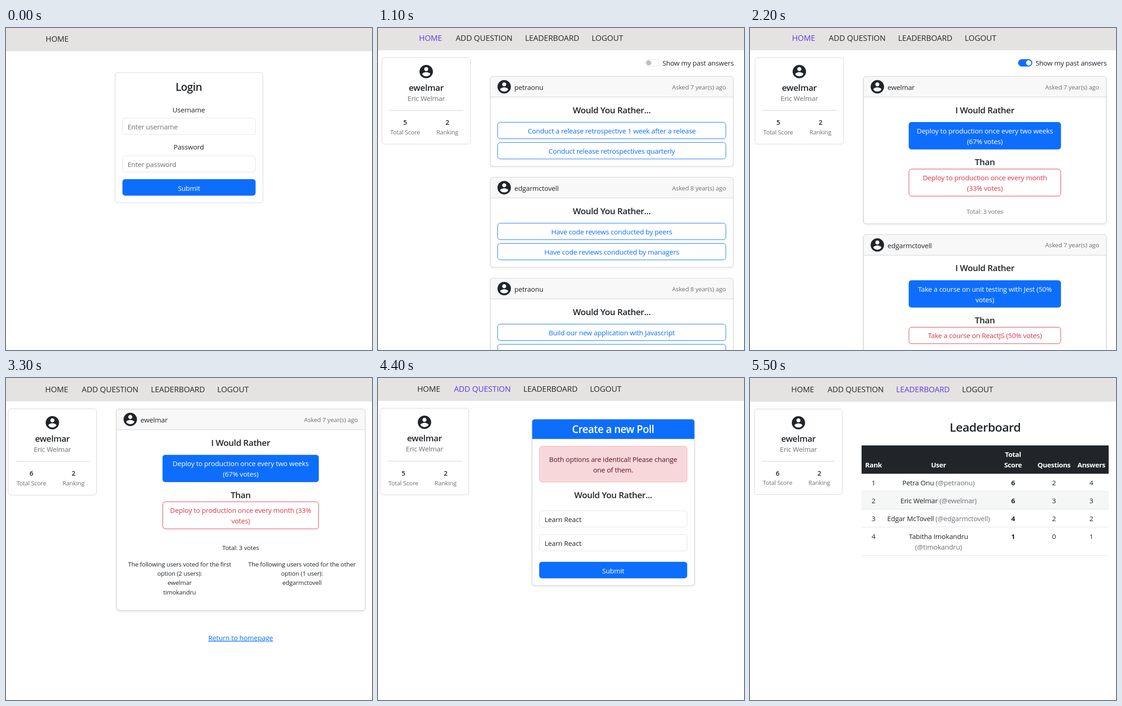
These frames come from a looping animation (797 by 702 pixels, 6.6 s). An HTML page:

```html
<!DOCTYPE html>
<html lang="en">
<head>
<meta charset="utf-8">
<title>Would You Rather</title>
<style>
  html, body { margin: 0; width: 100%; height: 100%; overflow: hidden; background: #fff; }
  svg { display: block; width: 797px; height: 702px; }
  text { font-family: "Open Sans", "Noto Sans", sans-serif; fill: #212529; text-anchor: middle; letter-spacing: -.013em; }
  .left { text-anchor: start; }
  .right { text-anchor: end; }
  .semi { font-weight: 600; letter-spacing: -.022em; }
  .bold { font-weight: 700; letter-spacing: -.03em; }
  .nav { letter-spacing: -.003em; }
  .gray { fill: #6c7075; }
  .white { fill: #fff; }
  .blue { fill: #0d6efd; }
  .red { fill: #dc3545; }
  .wine { fill: #58151c; }
  .active { fill: #6434e4; }
  .link { text-decoration: underline; }
  .shadow { filter: drop-shadow(0 2px 2px rgba(0, 0, 0, .075)); }
</style>
</head>
<body>
<svg id="stage" viewBox="0 0 797 702"></svg>
<script>
const STEP = 1100;
const BLUE = '#0d6efd', RED = '#dc3545', INK = '#212529', EDGE = '#d3d3d3', FIELD = '#dee2e6';

const me = { id: 'ewelmar', name: 'Eric Welmar' };
const petra = { id: 'petraonu', name: 'Petra Onu' };
const edgar = { id: 'edgarmctovell', name: 'Edgar McTovell' };
const tabitha = { id: 'timokandru', name: 'Tabitha Imokandru' };

// Open Sans looks larger than the UI font at the same nominal size.
const text = (str, x, y, cls = '', size = 16) =>
  `<text x="${x}" y="${y}" class="${cls}" font-size="${size * .9375}">${str}</text>`;

const lines = (list, x, y, cls, size, gap = 23.2) =>
  list.map((str, i) => text(str, x, y + i * gap, cls, size)).join('');

const box = (x, y, w, h, fill, stroke = 'none', cls = '', r = 6) =>
  `<rect x="${x}" y="${y}" width="${w}" height="${h}" rx="${r}" fill="${fill}" stroke="${stroke}" class="${cls}"/>`;

const rule = (x, y, w, color) => `<path d="M${x} ${y}h${w}" stroke="${color}"/>`;

const avatar = (x, y) => `<g transform="translate(${x} ${y})" fill="#fff">
  <circle r="14.6" fill="${INK}"/><circle cy="-5.3" r="4.4"/>
  <path d="M-8.8 5.8C-8.7 2.9-2.9 1.3 0 1.3S8.7 2.9 8.8 5.8C6.9 8.6 3.7 10.5 0 10.5S-6.9 8.6-8.8 5.8Z"/></g>`;

function headedCard(x, y, w, h, headH, headFill) {
  const r = 6;
  return box(x, y, w, h, '#fff', EDGE, 'shadow') +
    `<path d="M${x} ${y + headH}v${r - headH}q0-${r} ${r}-${r}h${w - 2 * r}q${r} 0 ${r} ${r}v${headH - r}z" fill="${headFill}"/>` +
    rule(x, y + headH, w, 'rgba(0,0,0,.175)') +
    box(x, y, w, h, 'none', EDGE);
}

const button = (str, x, y, w) => box(x, y, w, 36, BLUE) + text(str, x + w / 2, y + 25, 'white');

const field = (str, x, y, w, cls = '') =>
  box(x, y, w, 35.6, '#fff', FIELD) + text(str, x + 11.2, y + 24.4, 'left ' + cls);

// Header bar, menu and profile card; each screen sits at a slightly different offset.
function shell({ dx, dy, scale = 1, active, score }) {
  const menu = [['HOME', 89.2], ['ADD QUESTION', 169.2], ['LEADERBOARD', 320.2], ['LOGOUT', 465.2]];
  const shown = score ? menu : menu.slice(0, 1);
  const nav = shown.map(([str, x]) =>
    text(str, x, 28, 'left nav' + (str === active ? ' active' : ''), 18.1)).join('');
  const profile = score ? box(8.5, 64.5, 193, 188.7, '#fff', EDGE) + avatar(105, 95) +
    text(me.id, 105, 136.8, 'semi', 20) + text(me.name, 105, 158.6, 'gray') +
    rule(25, 179.7, 160.5, '#c8c9ca') +
    text(score, 59, 211.2, 'semi', 15.4) + text('2', 151, 211.2, 'semi', 15.4) +
    text('Total Score', 59, 232, 'gray', 14) + text('Ranking', 151, 232, 'gray', 14) : '';
  return `<rect width="797" height="702" fill="#fff"/>
    <rect width="797" height="${48.5 * scale + dy}" fill="#e4e3e1"/>
    <g transform="translate(${dx} ${dy}) scale(${scale})">${nav}${profile}</g>`;
}

function toggle(x, on) {
  return box(x, 68.5, 30, 15, on ? BLUE : '#fff', on ? BLUE : FIELD, '', 7.5) +
    `<circle cx="${x + (on ? 22.5 : 7.5)}" cy="76" r="5.7" fill="${on ? '#fff' : '#bfbfbf'}"/>` +
    text('Show my past answers', x + 37.4, 82.2, 'left');
}

function postCard(x, y, w, h, user, years) {
  return headedCard(x, y, w, h, 45, '#f8f8f8') + avatar(x + 30.3, y + 22.6) +
    text(user.id, x + 52.5, y + 29.2, 'left') +
    text(`Asked ${years} year(s) ago`, x + w - 15.8, y + 28, 'right gray', 14.4);
}

function question(y, user, years, options) {
  return postCard(244.5, y, 529, 196, user, years) +
    text('Would You Rather...', 509, y + 80, 'semi', 20) +
    options.map((str, i) => box(260.5, y + 100 + i * 44, 497, 36, '#fff', BLUE) +
      text(str, 509, y + 124.5 + i * 44, 'blue')).join('');
}

function verdict(cx, y, w, chosen, other) {
  const x = cx - w / 2, height = list => list.length * 23.2 + 12.6;
  return text('I Would Rather', cx, y, 'semi', 20) +
    box(x, y + 19.6, w, height(chosen) + .6, BLUE) + lines(chosen, cx, y + 44.2, 'white') +
    text('Than', cx, y + 113.6, 'semi', 20) +
    box(x + .5, y + 122, w - 1, height(other), '#fff', RED) + lines(other, cx, y + 146, 'red');
}

const login = () => shell({ dx: -3, dy: 2 }) +
  box(237.5, 97, 322, 284, '#fff', EDGE) + text('Login', 398, 137.2, 'semi', 24.5) +
  text('Username', 398, 183.6) + field('Enter username', 253.5, 196.5, 290, 'gray') +
  text('Password', 398, 265.4) + field('Enter password', 253.5, 278.5, 290, 'gray') +
  button('Submit', 253.5, 329.5, 290);

const unanswered = () => shell({ dx: 0, dy: 0, active: 'HOME', score: 5 }) + toggle(582, false) +
  question(105.5, petra, 7, ['Conduct a release retrospective 1 week after a release', 'Conduct release retrospectives quarterly']) +
  question(325.5, edgar, 8, ['Have code reviews conducted by peers', 'Have code reviews conducted by managers']) +
  question(545.5, petra, 8, ['Build our new application with Javascript', '']);

const answered = () => shell({ dx: 2.4, dy: 0, active: 'HOME', score: 5 }) + toggle(584.3, true) +
  postCard(247, 105.5, 529, 321.2, me, 7) +
  verdict(511.4, 185.5, 331.6, ['Deploy to production once every two weeks', '(67% votes)'],
    ['Deploy to production once every month', '(33% votes)']) +
  text('Total: 3 votes', 511.4, 405.2, 'gray', 14.4) +
  postCard(247, 450.4, 529, 298, edgar, 7) +
  verdict(511.4, 530.4, 331.6, ['Take a course on unit testing with Jest (50%', 'votes)'],
    ['Take a course on ReactJS (50% votes)']);

const detail = () => shell({ dx: -3.7, dy: 2.8, scale: .997, score: 6 }) +
  postCard(240.3, 67.7, 541.8, 439.5, me, 7) +
  verdict(511, 147.9, 340.4, ['Deploy to production once every two weeks', '(67% votes)'],
    ['Deploy to production once every month (33%', 'votes)']) +
  text('Total: 3 votes', 511, 375, '', 14.4) +
  lines(['The following users voted for the first', 'option (2 users):', me.id, tabitha.id], 378, 410.6, '', 14.2, 20.4) +
  lines(['The following users voted for the other', 'option (1 user):', edgar.id], 644.5, 410.6, '', 14.2, 20.4) +
  text('Return to homepage', 511, 572, 'blue link');

const newPoll = () => shell({ dx: -3.8, dy: 1.5, active: 'ADD QUESTION', score: 5 }) +
  headedCard(335.3, 89.8, 354, 362.7, 43, BLUE) + text('Create a new Poll', 512, 120, 'semi white', 24) +
  box(351.5, 148.8, 321.5, 78, '#f8d7da', '#f1aeb5') +
  lines(['Both options are identical! Please change', 'one of them.'], 512, 182.6, 'wine') +
  text('Would You Rather...', 512, 262.2, 'semi', 20) +
  field('Learn React', 351.5, 289.5, 321.5) + field('Learn React', 351.5, 341.4, 321.5) +
  button('Submit', 351, 400.8, 322.3);

function leaderboard() {
  const cols = [269, 410.5, 572.7, 662, 743.3];
  const head = ['Rank', 'User', 'Score', 'Questions', 'Answers'];
  const rows = [[petra, 6, 2, 4], [me, 6, 3, 3], [edgar, 4, 2, 2], [tabitha, 1, 0, 1]];
  const body = rows.map(([user, ...counts], i) => {
    const top = 208.5 + i * 39, base = top + 25.6, wraps = user === tabitha;
    const handle = `(@${user.id})`;
    const who = wraps
      ? text(user.name, cols[1], base) + text(handle, cols[1], base + 23, 'gray')
      : text(`${user.name} <tspan class="gray">${handle}</tspan>`, cols[1], base);
    return (user === me ? `<rect x="243" y="${top}" width="538" height="39" fill="#f5f6f6"/>` : '') +
      text(i + 1, cols[0], base) + who +
      counts.map((n, k) => text(n, cols[k + 2], base, k ? '' : 'bold')).join('') +
      rule(243, top + (wraps ? 62 : 39) - .5, 538, FIELD);
  }).join('');
  return shell({ dx: 1.6, dy: 3.7, scale: .989, active: 'LEADERBOARD', score: 6 }) +
    text('Leaderboard', 512, 117.4, 'semi', 27.8) +
    `<rect x="243" y="147" width="538" height="61.7" fill="${INK}"/>` +
    text('Total', cols[2], 172.2, 'bold white') +
    head.map((str, i) => text(str, cols[i], 195.2, 'bold white')).join('') + body;
}

const screens = [login, unanswered, answered, detail, newPoll, leaderboard];
const stage = document.getElementById('stage');
stage.innerHTML = screens.map(draw => `<g>${draw()}</g>`).join('');

const loop = STEP * screens.length;
[...stage.children].forEach((screen, i) => screen.animate([
  { opacity: 1, offset: 0, easing: 'steps(1)' },
  { opacity: 0, offset: 1 / screens.length, easing: 'steps(1)' },
  { opacity: 0, offset: 1 }
], { duration: loop, delay: i * STEP - loop, iterations: Infinity }));
</script>
</body>
</html>
```
